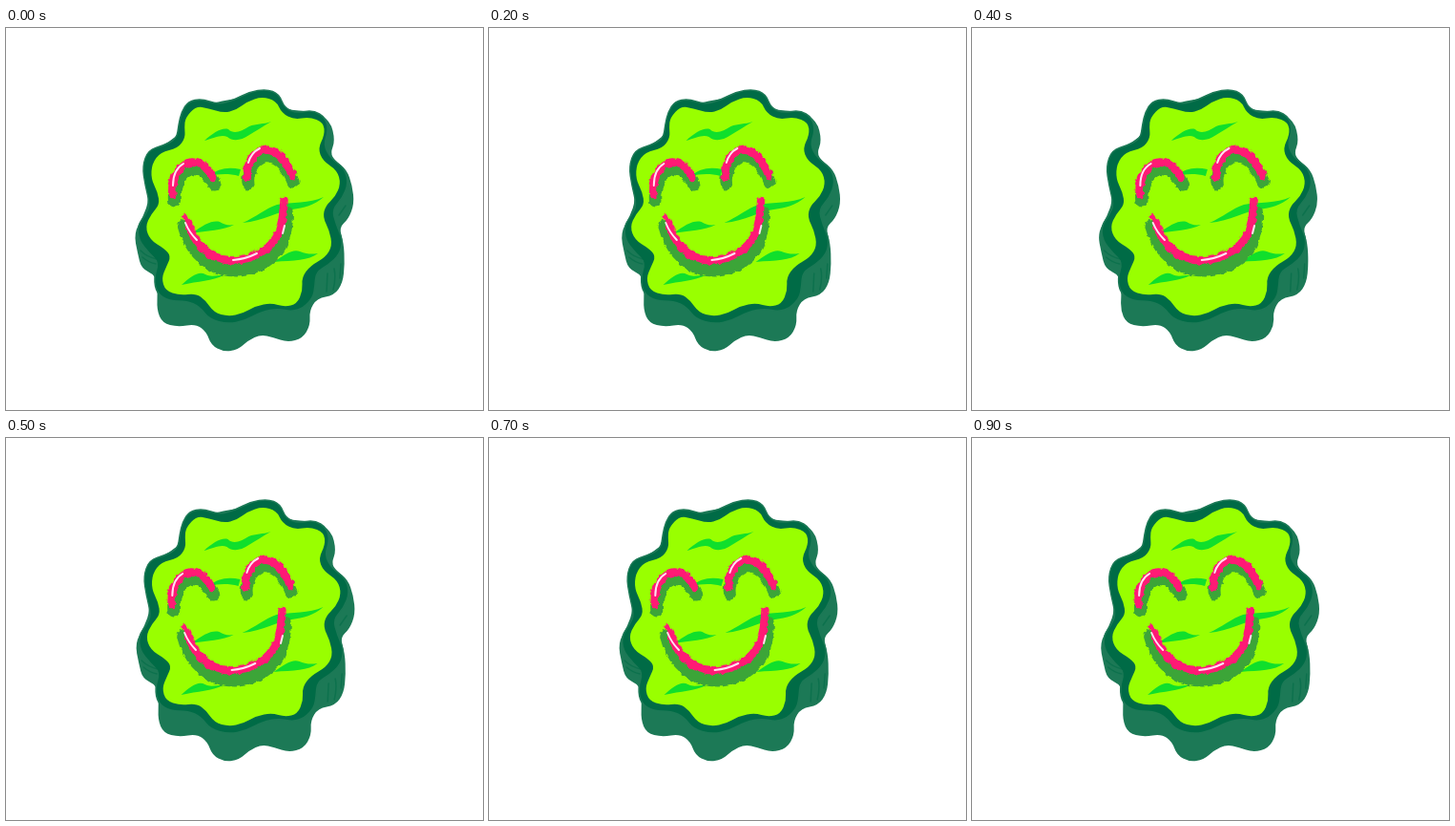
Write an HTML page that moves like this. It is 500 by 400 pixels and loops after 1000 ms.

```html
<!DOCTYPE html>
<html lang="en">
<head>
<meta charset="utf-8">
<title>Smiling pickle slice</title>
<style>
  @property --turn { syntax: "<number>"; inherits: true; initial-value: 0; }
  html, body { margin: 0; width: 100%; height: 100%; overflow: hidden; background: #fff; }
  svg { display: block; width: 500px; height: 400px; animation: sway 1s step-end infinite; }

  /* one turn value drives every depth layer */
  @keyframes sway {
    0% { --turn: 0; }
    10% { --turn: -3; }
    20% { --turn: -6.5; }
    30% { --turn: -10; }
    40% { --turn: 4; }
    50% { --turn: -2; }
    60% { --turn: -8.6; }
    70% { --turn: -2; }
    80% { --turn: 2; }
    90%, 100% { --turn: .4; }
  }
  .back { transform: translateX(calc(var(--turn) * -.58px)); }
  .top { transform: translateX(calc(var(--turn) * -.28px)); }
  .veins { transform: translateX(calc(var(--turn) * .22px)); fill: #10df2c; }
  .face { transform-origin: 115px 0; transform: scaleX(calc(1 + var(--turn) * .0057)); }

  .line { fill: none; stroke-linecap: round; stroke-linejoin: round; }
  .shade { stroke: #3ca538; }
  .pink { stroke: #ff1a75; }
  .shine { stroke: #ffe3f1; stroke-width: 2; }
  .grain { stroke: #006b46; stroke-width: 1.5; opacity: .55; }
</style>
</head>
<body>
<svg viewBox="0 0 500 400">
  <defs>
    <filter id="rough" x="-10%" y="-10%" width="120%" height="125%" color-interpolation-filters="sRGB">
      <feTurbulence type="fractalNoise" baseFrequency=".16" numOctaves="2" seed="4"/>
      <feDisplacementMap in="SourceGraphic" scale="5" xChannelSelector="R" yChannelSelector="G"/>
    </filter>
    <path id="eyeL" d="M174.500 174 C173 160 181 141 195 140.500 C206 141 213 149 217 157"/>
    <path id="eyeR" d="M253 156 C251 143 261 127.500 274 127.500 C287 129 295 142 300 154"/>
  </defs>

  <g class="back">
    <path id="side" fill="#1c7956"/>
    <path id="rim" fill="#006b46" stroke="#1c7956" stroke-width="1.500"/>
    <g class="line grain">
      <path d="M337 257 L336 276 M344 252 Q346 262 343 274 M351 247 L350 262 M349 196 L356 186"/>
      <path d="M141 233 Q148 240 158 242 M143 240 Q150 246 157 247"/>
    </g>
  </g>

  <path id="slice" class="top" fill="#99ff00"/>

  <g class="veins">
    <path d="M208 118 C217 110 226 104 233 106 C239 112 247 108 255 103 C262 100 270 101 278 98 C269 103 262 108 255 112 C246 118 238 119 232 114 C226 111 218 115 208 118Z"/>
    <path d="M213 155 C222 147 233 145 246 148 L244 155 C233 152 222 153 213 155Z"/>
    <path d="M195 215 C207 206 216 201 224 203 C229 206 233 207 239 206 C228 212 210 212 195 215Z"/>
    <path d="M248 204 C262 198 272 189 284 185 C300 182 318 184 333 177 C323 186 312 188 300 190 C285 192 270 202 248 204Z"/>
    <path d="M184 269 C194 260 202 254 209 258 C214 261 220 259 228 259 C216 265 202 265 184 269Z"/>
    <path d="M281 245 C292 237 301 231 308 234 C316 237 320 237 327 236 C317 244 302 243 281 245Z"/>
  </g>

  <g class="face">
    <g class="line shade" filter="url(#rough)">
      <use href="#eyeL" x="2" y="7" stroke-width="13"/>
      <use href="#eyeR" x="1" y="7" stroke-width="13"/>
      <path stroke-width="14" d="M187 208 C192 228 206 246 228 252 C252 258 278 245 287 228 C293 217 294 206 294 194"/>
    </g>
    <g class="line pink" filter="url(#rough)">
      <use href="#eyeL" stroke-width="8.500"/>
      <use href="#eyeR" stroke-width="8.500"/>
      <path stroke-width="6" d="M188 197 L193 209"/>
      <path stroke-width="8.500" d="M193 210 C201 229 213 242 237 243.500 C259 243 279 231 286 214 C290 203 291 191 291.500 181"/>
    </g>
    <path class="line shine" d="M175 165 C175 154 179 146 186 142 M254 141 C256 134 260 129 266 126 M188 204 Q192 214 200 222 M238 243 Q251 242 263 236 M292 207 L290 215"/>
  </g>
</svg>
<script>
  // closed curve through the midpoints of a point list
  function smooth(id, list) {
    const pts = list.trim().split(/\s+/).map(p => p.split(",").map(Number));
    const mid = (a, b) => (a[0] + b[0]) / 2 + " " + (a[1] + b[1]) / 2;
    let d = "M" + mid(pts[pts.length - 1], pts[0]);
    pts.forEach((p, i) => d += "Q" + p.join(" ") + " " + mid(p, pts[(i + 1) % pts.length]));
    document.getElementById(id).setAttribute("d", d + "Z");
  }

  smooth("slice", `188,94 199,82 212,84 228,89 241,86 253,77 268,72 283,76 289,89
    302,96 318,93 333,99 334,112 327,126 332,139 347,149 351,163 345,177 335,186
    332,198 339,212 342,228 335,240 319,249 310,261 311,275 305,289 292,292
    278,288 262,291 248,299 233,302 218,298 209,285 199,278 182,280 167,275
    163,262 168,250 173,239 166,231 151,222 146,208 152,195 161,185 159,172
    152,158 153,142 162,130 180,126 188,115 187,104`);

  smooth("rim", `184,88 191,77 205,74 222,80 240,75 255,67 273,64 286,69 292,84
    305,89 322,86 335,94 338,108 333,122 340,136 355,147 359,162 353,178 342,190
    346,205 353,222 350,237 338,248 325,256 324,270 322,282 312,293 300,297
    285,294 268,297 250,307 232,310 213,305 203,292 190,286 171,286 158,278
    155,262 160,245 150,236 139,222 138,207 146,196 151,185 146,165 143,145
    149,128 165,123 179,116 181,101`);

  smooth("side", `200,80 270,70 292,86 322,87 340,97 345,118 340,131 345,139
    357,148 363,165 365,184 359,200 349,209 354,225 355,247 353,267 344,280
    326,283 318,296 319,311 311,325 295,329 280,324 267,321 254,327 243,337
    228,339 215,332 210,318 199,310 180,313 164,309 158,295 159,276 157,259
    142,252 138,236 134,215 144,197 150,180 146,145 160,126 184,110`);
</script>
</body>
</html>
```
